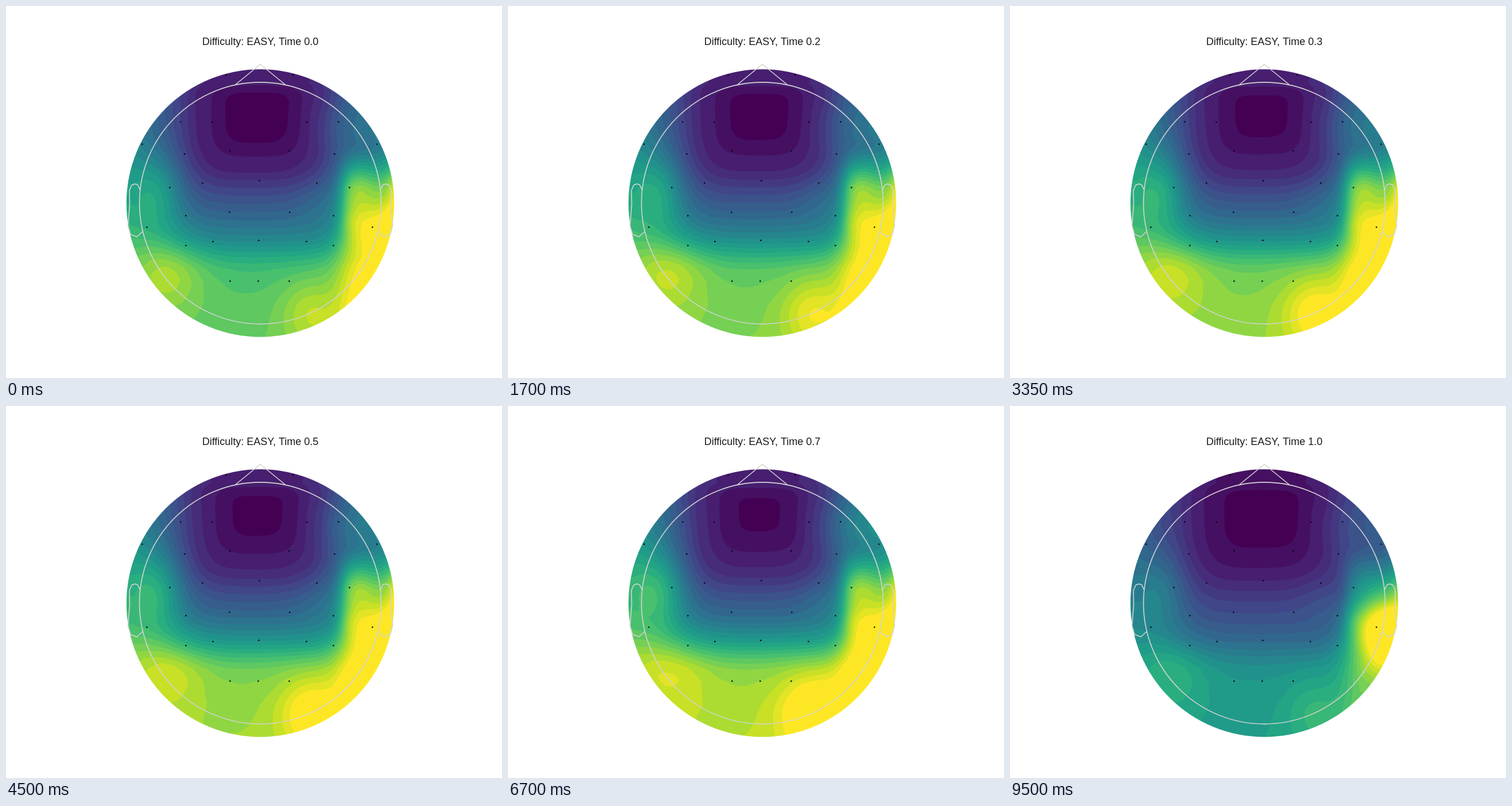
An HTML page with a canvas that plays this animation: 864 by 648 pixels, repeating every 10 s.

```html
<!DOCTYPE html>
<html lang="en">
<head>
<meta charset="utf-8">
<title>Scalp map</title>
<style>
html, body { margin: 0; width: 100%; height: 100%; overflow: hidden; background: #fff; }
canvas { display: block; }
</style>
</head>
<body>
<canvas id="stage" width="864" height="648"></canvas>
<script>
const ctx = document.getElementById("stage").getContext("2d");
const LOOP = 10000, DROP = 8750;
const CX = 443, CY = 343.4, RADIUS = 233.2, HEAD = 210.5;
const LEFT = 208, TOP = 108, SIZE = 472, BANDS = 25;

const clamp = (v, a, b) => Math.min(b, Math.max(a, v));
const ramp = (v, a, b) => { const u = clamp((v - a) / (b - a), 0, 1); return u * u * (3 - 2 * u); };
const bump = (x, y, cx, cy, sx, sy = sx) => Math.exp(-(((x - cx) / sx) ** 2 + ((y - cy) / sy) ** 2) / 2);

// Viridis, split into flat bands
const anchors = ["440154", "482475", "414487", "355f8d", "2a788e", "21918c",
  "22a884", "44bf70", "7ad151", "bddf26", "fde725"]
  .map(hex => [0, 2, 4].map(i => parseInt(hex.slice(i, i + 2), 16)));
const palette = Array.from({ length: BANDS }, (_, k) => {
  const p = k / (BANDS - 1) * 10, i = Math.min(9, Math.floor(p));
  return anchors[i].map((c, j) => c + (anchors[i + 1][j] - c) * (p - i));
});

// Band level against distance from the dark frontal core
const profile = [[0, 0], [58, 1], [82, 2], [110, 3], [126, 4.2], [155, 6.4], [198, 9.3],
  [228, 11.7], [260, 15.3], [278, 16.8], [300, 17.6], [340, 18.3], [420, 19]];
function levelAt(q) {
  const i = profile.findIndex(point => point[0] > q);
  const [[q0, v0], [q1, v1]] = profile.slice(i - 1, i + 1);
  return v0 + (v1 - v0) * (q - q0) / (q1 - q0);
}

function baseLevel(x, y) {
  const dx = x - 440, dy = y < 180 ? Math.min(90, 2 * (180 - y)) : y - 180;
  const bowl = levelAt((dx ** 4 + dy ** 4) ** .25);
  const low = ramp(y, 370, 450);
  const rightSide = ramp(y, 235, 325) * (13 - 4.7 * low) / (1 + Math.exp((586 - x) / (9 + 6 * low)));
  return bowl + rightSide
    + 5.5 * bump(x, y, 262, 325, 34, 50)
    + 4 * bump(x, y, 280, 465, 45)
    + 3.5 * bump(x, y, 530, 535, 36, 45)
    + 2.2 * bump(x, y, 585, 215, 40, 45)
    + 1.5 * bump(x, y, 555, 335, 35)
    - 4.5 * bump(x, y, 655, 310, 22, 35);
}

// Regions brighten gradually with p
const growth = (x, y, p) => .4 * p
  + 3.3 * p ** .7 * ramp(y, 350, 470)
  - 2 * p * bump(x, y, 275, 475, 40)
  + 3 * p ** .8 * bump(x, y, 535, 530, 50)
  + 2.4 * p * bump(x, y, 235, 315, 55)
  + 3 * p * p * bump(x, y, 625, 200, 60)
  + 1.6 * p * bump(x, y, 255, 215, 55);

// One strong peak on the right rescales the rest
const peaked = (x, y, level) => .74 * Math.min(level, 25)
  + 11 * bump(x, y, 655, 397, 34, 48)
  - 3 * bump(x, y, 605, 320, 28);

function sample(fn) {
  return Float32Array.from({ length: SIZE * SIZE },
    (_, i) => fn(LEFT + i % SIZE + .5, TOP + Math.floor(i / SIZE) + .5));
}
const base = sample(baseLevel);

function renderMap(t) {
  let n = 0;
  const level = sample((x, y) => t < DROP ? base[n++] + growth(x, y, t / 8350) : peaked(x, y, base[n++]));
  const map = document.createElement("canvas");
  map.width = map.height = SIZE;
  const mapCtx = map.getContext("2d"), image = mapCtx.createImageData(SIZE, SIZE);
  for (let i = 0; i < level.length; i++) {
    const v = clamp(level[i], 0, BANDS - .01), k = Math.floor(v);
    const right = level[i + 1] ?? level[i], below = level[i + SIZE] ?? level[i];
    const slope = Math.hypot(right - level[i], below - level[i]) + 1e-4;
    const mix = Math.min(1, (v - k) / slope), lower = palette[Math.max(0, k - 1)];
    for (let c = 0; c < 3; c++) image.data[i * 4 + c] = lower[c] + (palette[k][c] - lower[c]) * mix;
    image.data[i * 4 + 3] = 255;
  }
  mapCtx.putImageData(image, 0, 0);
  return map;
}

const disc = new Path2D();
disc.arc(CX, CY, RADIUS, 0, 7);

const outline = new Path2D();
const polyline = points => points.forEach(([x, y], i) => i ? outline.lineTo(x, y) : outline.moveTo(x, y));
outline.arc(CX, CY, HEAD, 0, 2 * Math.PI);
polyline([[399, 137.5], [443, 101.5], [487, 137.5]]);
const ear = [[233.5, 320], [229, 311], [224, 310], [219, 312], [215, 321], [215.5, 346],
  [212.5, 383], [217, 398], [228, 402], [238, 393]];
polyline(ear);
polyline(ear.map(([x, y]) => [2 * CX - x, y]));

// Sensors come in mirrored pairs, plus two on the midline
const pairs = [[383, 120], [304, 201.5], [359, 202], [237, 240.5], [390, 252], [311, 257.5], [285, 316],
  [342, 308], [313, 365], [389, 359], [245, 385], [313, 417], [360, 410], [390, 479]];
const sensors = [...pairs, ...pairs.map(([x, y]) => [883 - x, y]), [441, 304], [440, 408], [439, 479]];

// The map refreshes about every 417 ms, the clock label about every second; both on 50 ms ticks
const mapStep = t => Math.floor((t + 35) / 417);
const stepTime = step => step * 417;
const clock = t => Math.round(t / 950 - .03);
const maps = [];

function draw(t) {
  const step = mapStep(t);
  maps[step] ??= renderMap(stepTime(step));
  ctx.fillStyle = "#fff";
  ctx.fillRect(0, 0, 864, 648);
  ctx.save();
  ctx.clip(disc);
  ctx.drawImage(maps[step], LEFT, TOP);
  ctx.restore();

  ctx.fillStyle = "#000";
  for (const [x, y] of sensors) {
    ctx.beginPath();
    ctx.arc(x + .3, y + .3, 1.25, 0, 7);
    ctx.fill();
  }
  ctx.strokeStyle = "#d3d3d3";
  ctx.lineWidth = 1.6;
  ctx.lineJoin = "round";
  ctx.stroke(outline);

  ctx.fillStyle = "#1a1a1a";
  ctx.font = "18px 'Liberation Sans', Arial, sans-serif";
  ctx.textAlign = "center";
  const seconds = Math.min(10, Math.floor((t + 480) / 995));
  ctx.fillText(`Difficulty: EASY, Time ${(seconds / 10).toFixed(1)}`, CX, 68);
}

const start = performance.now();
function frame() {
  draw((performance.now() - start) % LOOP);
  requestAnimationFrame(frame);
}
frame();
</script>
</body>
</html>
```
